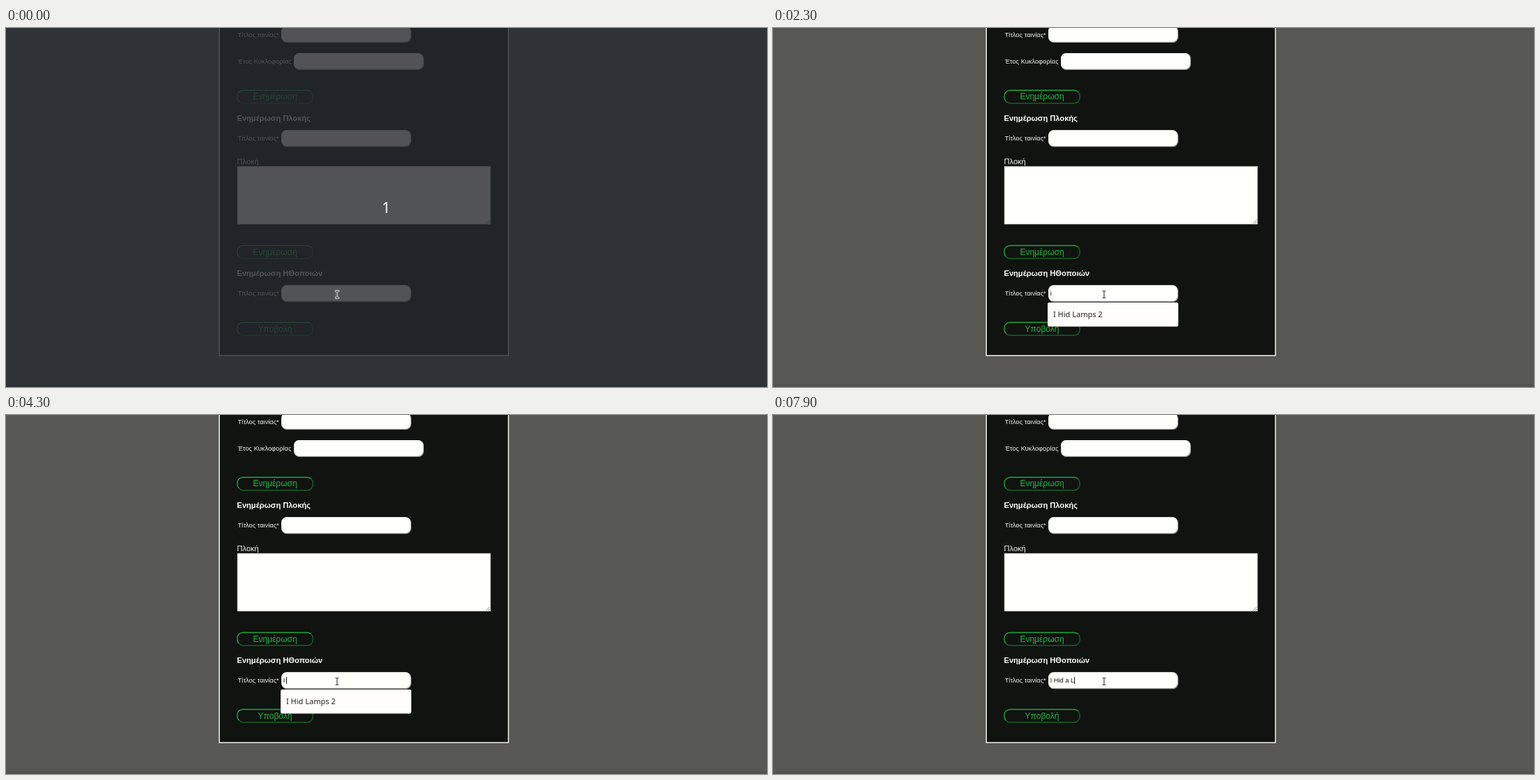
Write an HTML page that moves like this. It is 1089 px wide and 514 px high and loops after 8000 ms.

```html
<!DOCTYPE html>
<html lang="el">
<head>
<meta charset="utf-8">
<title>Φόρμα ενημέρωσης</title>
<style>
  html, body { margin: 0; width: 100%; height: 100%; overflow: hidden; background: #575853; }
  svg { display: block; width: 100%; height: 100%; }
  text { font-family: "Liberation Sans", Arial, sans-serif; white-space: pre; }
  .label { font-size: 9.25px; fill: #f4f5f2; }
  .body { font-size: 11.1px; fill: #f4f5f2; }
  .head { font-size: 11.1px; font-weight: bold; fill: #fffffb; }
  .btn { font-size: 12px; fill: #25b845; text-anchor: middle; }
  .typed { font-size: 9.25px; fill: #111; }
  .item { font: 500 11px "Noto Sans", "Open Sans", sans-serif; fill: #222; }
  .count { font: 21px "Noto Sans", "Open Sans", sans-serif; fill: #fff; text-anchor: middle; }
</style>
</head>
<body>
<svg id="stage" viewBox="0 0 1089 514" xmlns="http://www.w3.org/2000/svg">
  <rect width="1089" height="514" fill="#575853"/>
  <rect y="510" width="1089" height="4" fill="#525350"/>
  <rect x="305.3" y="-10" width="413.7" height="479" fill="#101310" stroke="#fffffb" stroke-width="1.4"/>
  <g id="form"></g>
  <text id="typed" class="typed" x="396.7" y="383"></text>
  <rect id="caret" y="375" width="1" height="10" fill="#222"/>
  <g id="popup">
    <rect id="box" x="393" y="393" width="187" rx="2.5" fill="#fffefc"/>
    <text class="item" x="401" y="414">I Hid Lamps 2</text>
  </g>
  <g id="dim">
    <rect width="1089" height="514" fill="#26292f" opacity=".8"/>
    <text class="count" x="544" y="264.5">1</text>
  </g>
  <g fill="none" stroke-linecap="square">
    <path id="beamEdge" stroke="#fff" stroke-width="2.4"/>
    <path id="beam" stroke="#222" stroke-width="1"/>
  </g>
</svg>
<script>
const LOOP = 8000;
const $ = id => document.getElementById(id);

const label = (cls, x, y, s) => `<text class="${cls}" x="${x}" y="${y}">${s}</text>`;

const input = (x, y) => `
  <rect x="${x}" y="${y}" width="186" height="24" rx="8" fill="#a3a4a0"/>
  <rect x="${x}" y="${y}" width="184.8" height="22.7" rx="7.5" fill="#fffffb"/>`;

// Outset border: light on the top and left, dark on the bottom and right
const button = (y, s) => `
  <g fill="none" stroke-width="1.4" transform="translate(331 ${y})">
    <path stroke="#23a53e" d="M2.3 16.2A8 8 0 0 1 0 10V8.5A8 8 0 0 1 8 .5H100A8 8 0 0 1 105.7 2.8"/>
    <path stroke="#146127" d="M105.7 2.8A8 8 0 0 1 108 8.5V11A8 8 0 0 1 100 19H8A8 8 0 0 1 2.3 16.2"/>
  </g>` + label("btn", 385, y + 13.5, s);

$("form").innerHTML = [
  label("label", 331.7, 12.7, "Τίτλος ταινίας*"), input(394, -3),
  label("label", 331.7, 50.7, "Έτος Κυκλοφορίας"), input(412, 36),
  button(88.8, "Ενημέρωση"),
  label("head", 330.5, 132.5, "Ενημέρωση Πλοκής"),
  label("label", 331.7, 161, "Τίτλος ταινίας*"), input(394, 146.3),
  label("body", 330.5, 194.5, "Πλοκή"),
  `<rect x="331" y="198" width="362.5" height="83" fill="#fffffb" stroke="#77786f" stroke-width=".6"/>
   <path d="M687 280L692.5 274.5M690 280L692.5 277.5" stroke="#777" stroke-width=".8"/>`,
  button(311, "Ενημέρωση"),
  label("head", 330.5, 355, "Ενημέρωση ΗΘοποιών"),
  label("label", 331.7, 383, "Τίτλος ταινίας*"), input(394, 368.3),
  button(421, "Υποβολή")
].join("");

const beam = "M472 376.5H473L473.8 377.2L474.6 376.5H475.6M473.8 377.2V385.8M472 386.5H473L473.8 385.8L474.6 386.5H475.6";
$("beam").setAttribute("d", beam);
$("beamEdge").setAttribute("d", beam);

// time, typed text, caret shown, popup opacity, popup height
const steps = [
  [0, "", 0, 0],
  [1000, "", 1, 0],
  [1600, "i", 1, .3, 59],
  [1700, "i", 1, .75, 59],
  [1800, "i", 1, 1],
  [2300, "i", 0, 1],
  [2900, "i", 1, 1],
  [3100, "", 1, .9],
  [3200, "", 1, .5],
  [3300, "", 1, .09],
  [3500, "I", 1, .6],
  [3600, "I", 1, 1],
  [4300, "I ", 1, 1],
  [4700, "I h", 1, 1],
  [4800, "I hid", 1, 1],
  [5400, "I hid", 0, 1],
  [5500, "I h", 1, 1],
  [5600, "I ", 1, 1],
  [5900, "I H", 1, 1],
  [6300, "I Hid", 1, 1],
  [6600, "I Hid ", 1, 1],
  [7000, "I Hid a", 1, .75],
  [7100, "I Hid a", 1, .3],
  [7200, "I Hid a", 1, 0],
  [7700, "I Hid a", 0, 0],
  [7900, "I Hid a L", 1, 0]
];

function draw(t) {
  const [, text, caret, alpha, height = 34.5] = steps.findLast(s => s[0] <= t);
  $("dim").style.display = t < 400 ? "" : "none";

  const typed = $("typed");
  typed.textContent = text;
  const end = text ? typed.getComputedTextLength() : 0;
  $("caret").setAttribute("x", Math.floor(396.7 + end));
  $("caret").style.display = caret ? "" : "none";

  const k = .953 + .047 * alpha, cx = 486.5, cy = 393 + height / 2;
  $("box").setAttribute("height", height);
  $("popup").setAttribute("opacity", alpha);
  $("popup").setAttribute("transform", `translate(${cx} ${cy}) scale(${k}) translate(${-cx} ${-cy})`);
}

const start = performance.now();
function tick() {
  draw((performance.now() - start) % LOOP);
  requestAnimationFrame(tick);
}
tick();
</script>
</body>
</html>
```
